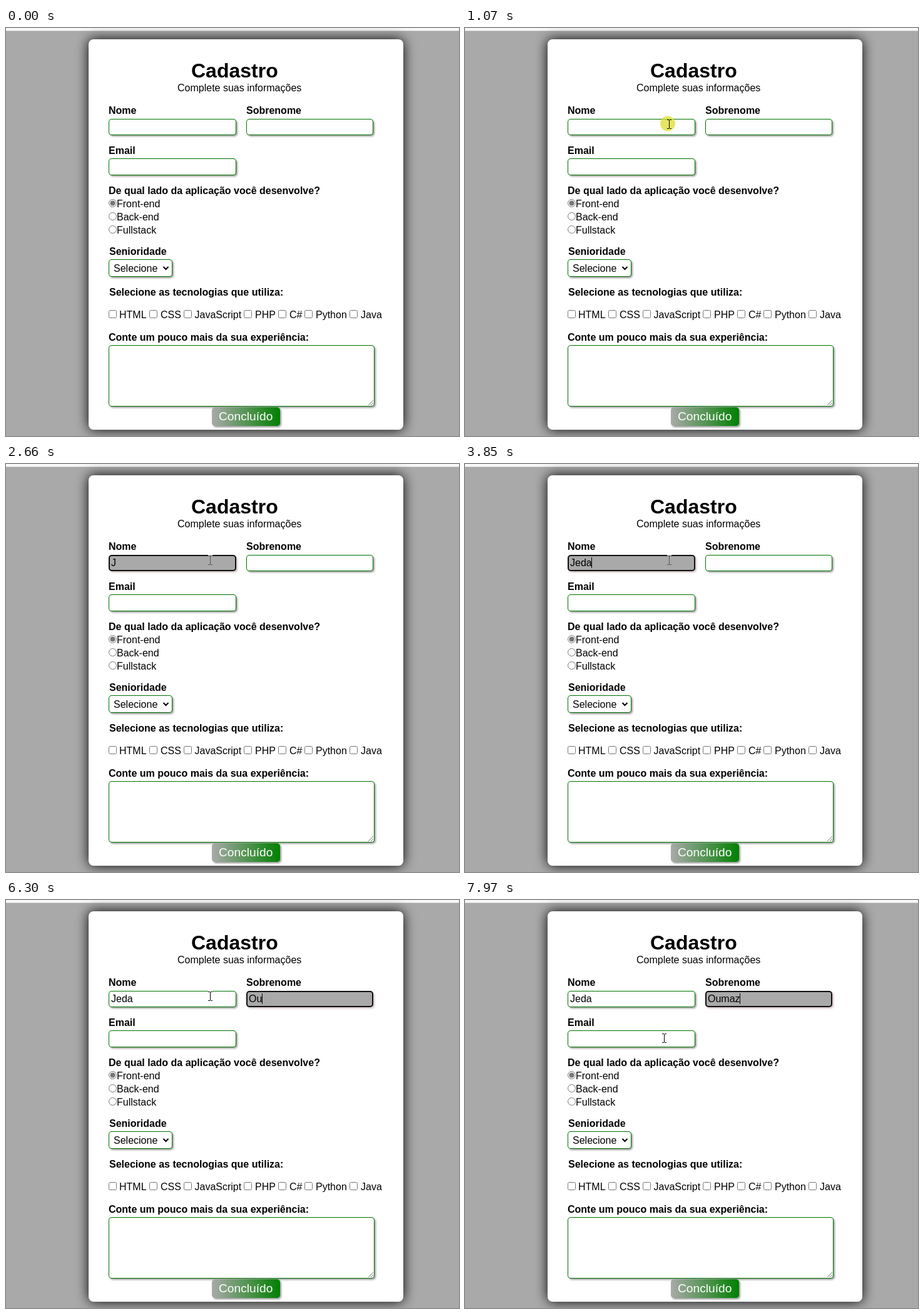
Write an HTML page with a canvas that moves like this. It is 724x651 px and loops after 8 s.

```html
<!DOCTYPE html>
<html lang="pt-BR">
<head>
<meta charset="utf-8">
<title>Cadastro</title>
<style>
  html, body { margin: 0; width: 100%; height: 100%; overflow: hidden; background: #a9a9a9; }
  canvas { display: block; }
</style>
</head>
<body>
<canvas id="stage" width="724" height="651"></canvas>
<script>
const LOOP = 8000;
const FONT = '"Liberation Sans", Arial, sans-serif';
const GREY = '#a9a9a9';
const stage = document.getElementById('stage');
const base = document.createElement('canvas');
base.width = stage.width;
base.height = stage.height;
let c = base.getContext('2d');

function text(str, x, y, { size = 16, bold = false, color = '#000' } = {}) {
  c.font = `${bold ? 'bold ' : ''}${size}px ${FONT}`;
  c.fillStyle = color;
  c.fillText(str, x, y);
}

const label = (str, x, y) => text(str, x, y, { bold: true });

function rounded(x, y, w, h, r) {
  c.beginPath();
  c.roundRect(x, y, w, h, r);
}

function shadow(color, blur, dx, dy) {
  c.shadowColor = color;
  c.shadowBlur = blur;
  c.shadowOffsetX = dx;
  c.shadowOffsetY = dy;
}

// Rounded control with a border drawn inside its box
function field(x, y, w, h, focused = false) {
  const line = focused ? 2 : 1;
  c.save();
  shadow(focused ? 'rgba(150,110,110,.45)' : 'rgba(0,0,0,.4)', 3, 2, 2);
  c.fillStyle = focused ? '#101010' : '#007400';
  rounded(x, y, w, h, 5);
  c.fill();
  c.restore();
  c.fillStyle = focused ? GREY : '#fff';
  rounded(x + line, y + line, w - 2 * line, h - 2 * line, 5 - line);
  c.fill();
}

function radio(str, y, checked) {
  c.strokeStyle = '#767676';
  c.fillStyle = '#767676';
  c.lineWidth = 1;
  c.beginPath();
  c.arc(170.5, y, 6, 0, 7);
  c.stroke();
  if (checked) {
    c.beginPath();
    c.arc(170.5, y, 4, 0, 7);
    c.fill();
  }
  text(str, 177, y + 6.5);
}

function checkbox(str, x, tx) {
  c.strokeStyle = '#767676';
  c.lineWidth = 1;
  rounded(x + .5, 450.5, 12, 12, 2);
  c.stroke();
  text(str, tx, 463);
}

function path(points) {
  c.beginPath();
  points.forEach(([x, y]) => c.lineTo(x, y));
}

function drawForm() {
  c.fillStyle = GREY;
  c.fillRect(0, 0, 724, 651);
  c.fillStyle = '#f8f8f8';
  c.fillRect(0, 0, 724, 4);
  c.fillStyle = '#d2d2d2';
  c.fillRect(0, 4, 724, 1);

  c.save();
  shadow('#000', 20, 0, 0);
  c.fillStyle = '#fff';
  rounded(132, 18, 503, 623, 8);
  c.fill();
  c.restore();

  text('Cadastro', 296, 79, { size: 32, bold: true });
  text('Complete suas informações', 274, 101);
  label('Nome', 164, 137);
  label('Sobrenome', 384, 137);
  label('Email', 164, 201);
  field(164, 208, 204, 27);

  label('De qual lado da aplicação você desenvolve?', 164, 265);
  radio('Front-end', 279.5, true);
  radio('Back-end', 300.5);
  radio('Fullstack', 321.5);

  label('Senioridade', 165, 362);
  field(164, 369, 102, 28);
  text('Selecione', 172, 389);
  c.strokeStyle = '#000';
  c.lineWidth = 2;
  path([[251.5, 381], [255.5, 385], [259.5, 381]]);
  c.stroke();

  label('Selecione as tecnologias que utiliza:', 165, 427);
  [['HTML', 164, 181], ['CSS', 229, 247], ['JavaScript', 284, 301.5], ['PHP', 380, 398],
   ['C#', 435, 453], ['Python', 477, 495], ['Java', 549, 567]].forEach(b => checkbox(...b));

  label('Conte um pouco mais da sua experiência:', 164, 499);
  field(164, 506, 425, 98);
  c.strokeStyle = '#777';
  c.lineWidth = 1;
  for (const d of [8, 4]) {
    path([[587 - d, 602], [587, 602 - d]]);
    c.stroke();
  }

  const fade = c.createLinearGradient(329, 0, 439, 0);
  fade.addColorStop(0, GREY);
  fade.addColorStop(1, '#008000');
  c.save();
  shadow('rgba(0,0,0,.4)', 3, 2, 2);
  c.fillStyle = fade;
  rounded(329, 605, 109, 30, 5);
  c.fill();
  c.restore();
  text('Concluído', 340, 626, { size: 19.2, color: '#fff' });
}

// Typed fields: key times, and spans in which the caret is lit
const inputs = [
  { x: 164, w: 204, word: 'Jeda', keys: [2130, 2800, 3650, 3850], focus: [1140, 4380],
    caret: [[1140, 1670], [2130, 2660], [2800, 3320], [3650, 4380]] },
  { x: 384, w: 203, word: 'Oumaz', keys: [6050, 6300, 6450, 6650, 6980], focus: [4380, LOOP],
    caret: [[4380, 4910], [5390, 5970], [6050, 7440], [7970, LOOP]] }
];
const within = (t, [a, b]) => t >= a && t < b;

function drawInput({ x, w, word, keys, focus, caret }, t) {
  const typed = word.slice(0, keys.filter(k => t >= k).length);
  field(x, 145, w, 26, within(t, focus));
  text(typed, x + 4, 163);
  if (caret.some(span => within(t, span))) {
    c.fillStyle = '#000';
    c.fillRect(Math.floor(x + 4 + c.measureText(typed).width), 149, 1, 17);
  }
}

function arrow(x, y) {
  c.save();
  c.translate(x + .5, y + .5);
  path([[0, 0], [0, 16], [3.7, 12.5], [6.2, 18], [8.6, 17], [6.2, 11.5], [11, 11.5]]);
  c.closePath();
  c.fillStyle = '#fff';
  c.fill();
  c.strokeStyle = '#111';
  c.lineWidth = 1;
  c.stroke();
  c.restore();
}

function beam(x, y, color) {
  c.fillStyle = color;
  c.fillRect(x, y - 6, 1, 13);
  for (const end of [y - 7, y + 7]) {
    c.fillRect(x - 3, end, 3, 1);
    c.fillRect(x + 1, end, 3, 1);
  }
}

function drawPointer(t) {
  if (t < 260) return;
  if (t < 670) {
    const p = Math.min(5, Math.floor((t - 260) / 68)) / 5;
    const left = (1 - p) ** 2;
    arrow(Math.round(332 + 280 * left), Math.round(124 + 352 * left));
  } else if (t < 740) {
    arrow(328, 138);
  } else if (t < 7640) {
    if (within(t, [1000, 1210])) {
      c.fillStyle = `rgba(222,222,45,${t < 1070 ? .6 : .75})`;
      c.beginPath();
      c.arc(324, 152.5, 12, 0, 7);
      c.fill();
    } else {
      c.fillStyle = '#fff';
      c.fillRect(323, 145, 7, 1);
    }
    beam(326, 153, within(t, inputs[0].focus) ? '#505050' : '#000');
  } else if (t < 7700) {
    beam(325, 162, '#000');
  } else if (t < 7770) {
    arrow(321, 186);
  } else {
    beam(318, t < 7840 ? 217 : t < 7970 ? 222 : 220, '#000');
  }
}

drawForm();
c = stage.getContext('2d');
const start = performance.now();

function frame(now) {
  const t = Math.max(0, now - start) % LOOP;
  c.drawImage(base, 0, 0);
  inputs.forEach(input => drawInput(input, t));
  drawPointer(t);
  requestAnimationFrame(frame);
}
frame(start);
</script>
</body>
</html>
```
